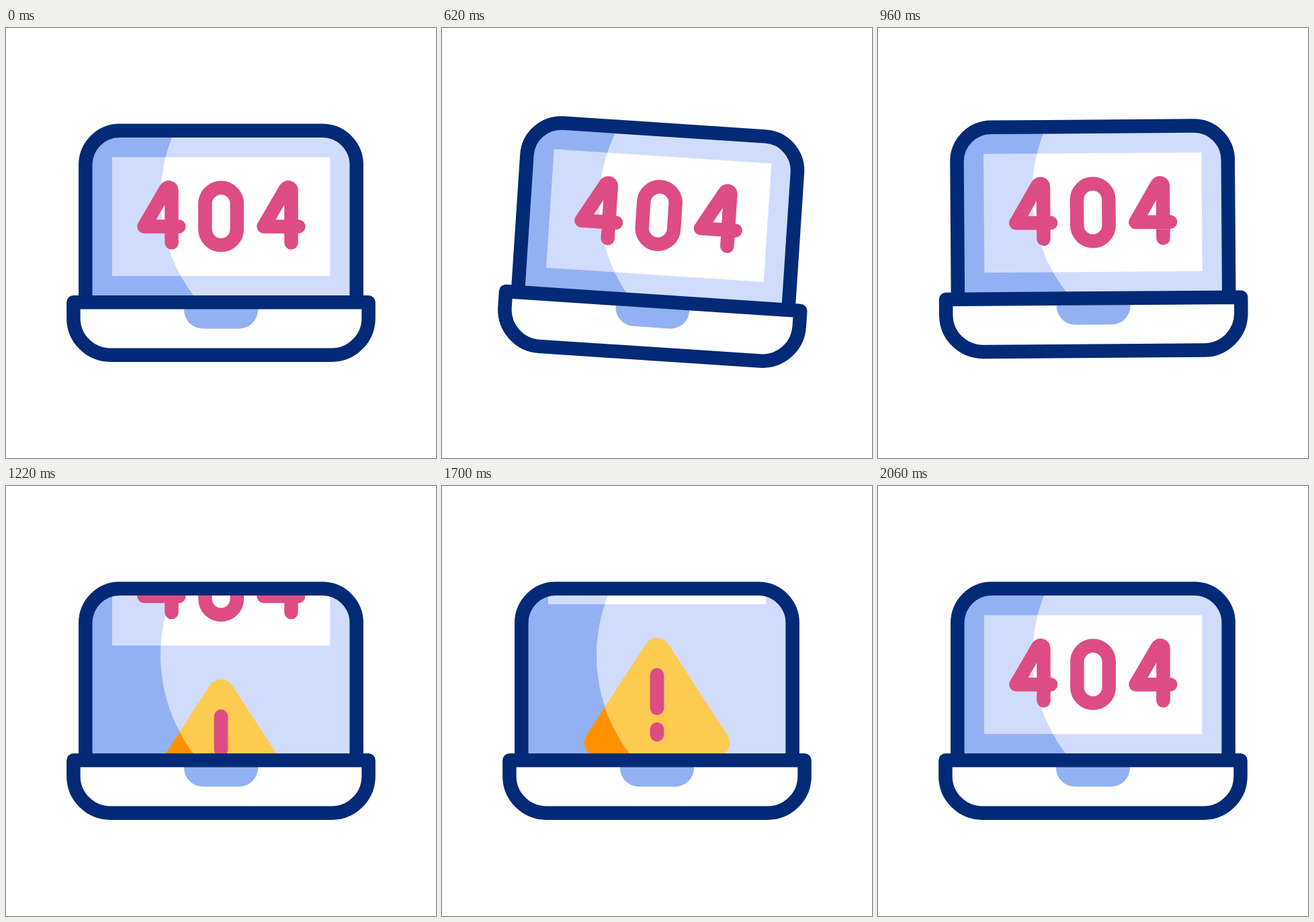
An HTML page for the animation above (2.4 s loop, 640 by 640 pixels).

```html
<!DOCTYPE html>
<html lang="en">
<head>
<meta charset="utf-8">
<title>Laptop error</title>
<style>
  html, body { margin: 0; width: 100%; height: 100%; overflow: hidden; background: #fff; }
  svg { display: block; width: 100vw; height: 100vh; }
  .line { fill: none; stroke: #022a76; stroke-width: 20.5; stroke-linejoin: round; }
  .digits { fill: none; stroke: #dd4c85; stroke-width: 20.5; stroke-linecap: round; stroke-linejoin: round; }
  .mark { fill: #dd4c85; }
  .sign { stroke-width: 40; stroke-linejoin: round; }
  .shade .back { fill: #92b1f3; }
  .shade .panel, .lit .back { fill: #d1dcfd; }
  .shade .sign { fill: #ff9100; stroke: #ff9100; }
  .lit .panel { fill: #fff; }
  .lit .sign { fill: #fecb51; stroke: #fecb51; }
</style>
</head>
<body>
<svg viewBox="0 0 640 640">
  <defs>
    <path id="lid" d="M118.3 408V203.7a51 51 0 0 1 51-51H470.7a51 51 0 0 1 51 51V408"/>
    <path id="four" d="M246.5 319.5V242c0-5-6-6.4-8.6-2.1L205.5 295.5H257.3"/>
    <clipPath id="screen"><use href="#lid"/></clipPath>
    <clipPath id="light"><circle cx="472" cy="252" r="242"/></clipPath>
    <g id="content">
    </g>
  </defs>
  <g id="laptop">
    <g clip-path="url(#screen)">
      <g class="shade"></g>
      <g class="lit" clip-path="url(#light)"></g>
      <g class="scroll">
        <g class="digits">
          <use href="#four"/>
          <rect x="296.4" y="237.8" width="47.4" height="85.5" rx="23.7"/>
          <use href="#four" x="178"/>
        </g>
        <g class="mark">
          <rect x="309.6" y="464.2" width="20.8" height="70" rx="10.4"/>
          <rect x="309.6" y="545" width="20.8" height="28.6" rx="10.4"/>
        </g>
      </g>
    </g>
    <use href="#lid" class="line"/>
    <path fill="#fff" d="M100.4 408.3H539.6V431.7a55 55 0 0 1-55 55H155.4a55 55 0 0 1-55-55Z"/>
    <path fill="#92b1f3" d="M265 410H375V419.5a28 28 0 0 1-28 28H293a28 28 0 0 1-28-28Z"/>
    <path class="line" d="M100.4 408.3H539.6V431.7a55 55 0 0 1-55 55H155.4a55 55 0 0 1-55-55Z"/>
  </g>
</svg>
<script>
  const LOOP = 2400, STEP = 20;

  // Each track is a list of [time in ms, value] keys.
  const tilt = [[200, 0], [400, -4], [600, 4], [800, -4], [1000, 0]];
  const lift = [[600, 0], [800, -57.6], [1000, 0]];
  const scroll = [[1000, 0], [1400, -229], [1600, -229], [2000, 0]];

  const ease = u => u * u * (3 - 2 * u);

  function valueAt(keys, t) {
    if (t <= keys[0][0]) return keys[0][1];
    for (let i = 1; i < keys.length; i++) {
      const [t0, a] = keys[i - 1], [t1, b] = keys[i];
      if (t < t1) return a + (b - a) * ease((t - t0) / (t1 - t0));
    }
    return keys[keys.length - 1][1];
  }

  // The lit and shaded layers share shapes and differ only in colour.
  for (const layer of document.querySelectorAll('.shade, .lit')) {
    layer.innerHTML = `
      <rect class="back" x="108" y="142" width="424" height="270"/>
      <g class="scroll">
        <rect class="panel" x="158" y="192.3" width="324.3" height="176.8"/>
        <path class="sign" d="M320 439.4L408.3 575.4H231.7Z"/>
      </g>`;
  }

  const laptop = document.getElementById('laptop');
  const scrollers = document.querySelectorAll('.scroll');

  function draw(t) {
    laptop.setAttribute('transform',
      `translate(0 ${valueAt(lift, t)}) rotate(${valueAt(tilt, t)} 320 320)`);
    for (const el of scrollers)
      el.setAttribute('transform', `translate(0 ${valueAt(scroll, t)})`);
  }

  function tick() {
    const t = performance.now() % LOOP;
    draw(Math.floor(t / STEP) * STEP);
    requestAnimationFrame(tick);
  }
  tick();
</script>
</body>
</html>
```
